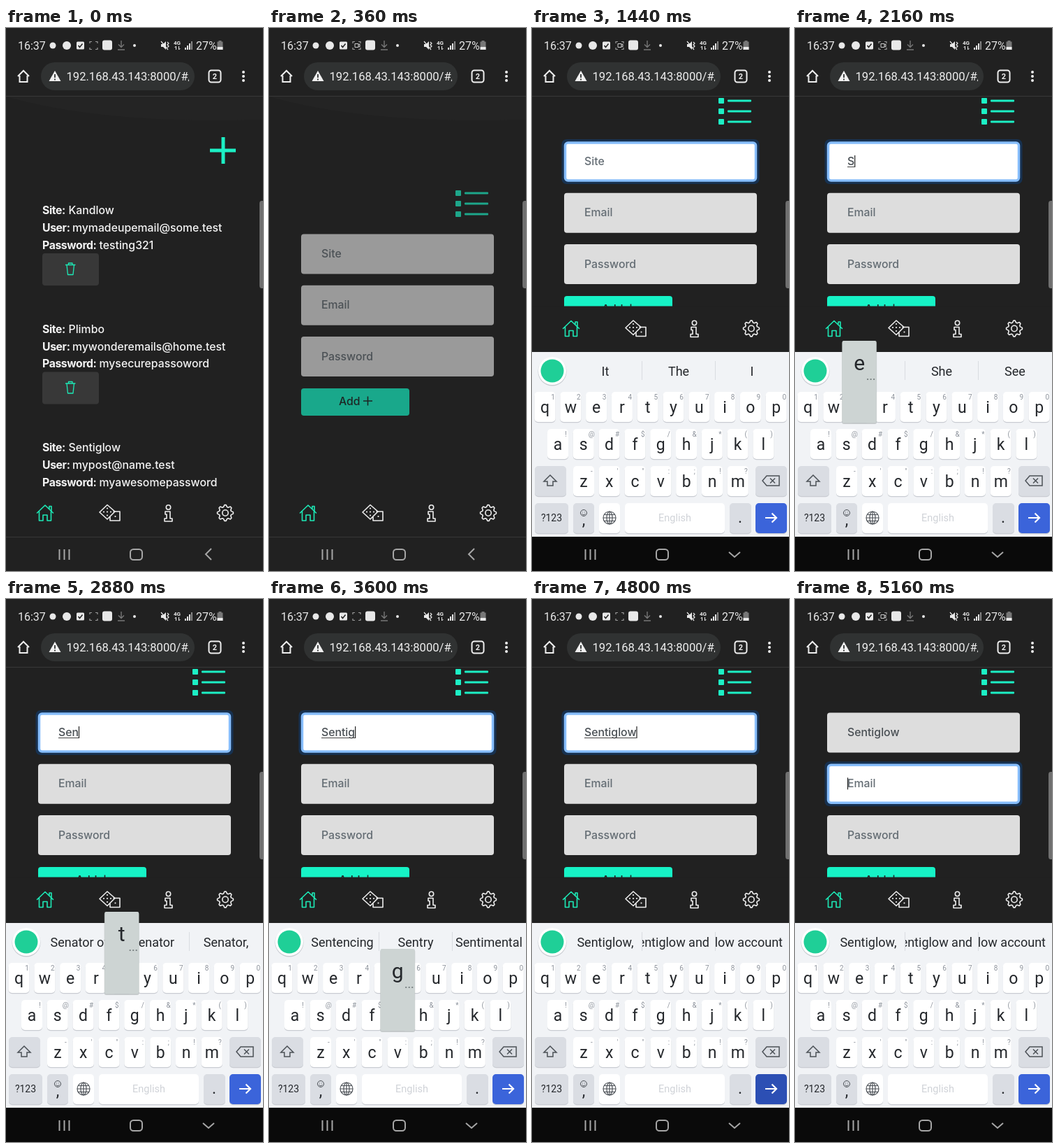
Write an HTML page that moves like this. It is 368x776 px and loops after 5280 ms.

```html
<!DOCTYPE html>
<html lang="en">
<head>
<meta charset="utf-8">
<title>Password list</title>
<style>
html, body { margin: 0; width: 100%; height: 100%; overflow: hidden; background: #212121; }
svg { display: block; width: 368px; height: 776px; }
text { font-family: Roboto, sans-serif; white-space: pre; }
.page text { font: 500 15.8px Inter, sans-serif; }
.list text { fill: #f4f4f4; }
.page .b { font-weight: 700; letter-spacing: -.4px; }
.line { fill: none; stroke: #eee; stroke-width: 1.6; stroke-linejoin: round; stroke-linecap: round; }
.mint { stroke: #1de9b6; }
.thin { stroke-width: 1.3; }
.dots { stroke-width: 2.2; }
.sys { fill: none; stroke: #a6a6a6; stroke-width: 2; }
.mid { text-anchor: middle; }
.hint { font-size: 10px; fill: #8d939c; text-anchor: middle; }
.key { font-size: 23px; fill: #24272b; text-anchor: middle; }
.sug { font-size: 18px; fill: #24272b; }
</style>
</head>
<body>
<svg viewBox="0 0 368 776">
  <defs>
    <clipPath id="view"><rect y="98" width="368" height="629"/></clipPath>
    <clipPath id="url"><rect x="80" y="50" width="182" height="38"/></clipPath>
    <clipPath id="cell0"><rect x="53" y="466" width="104" height="48"/></clipPath>
    <clipPath id="cell1"><rect x="158" y="466" width="104" height="48"/></clipPath>
    <clipPath id="cell2"><rect x="263" y="466" width="105" height="48"/></clipPath>
  </defs>
  <rect width="368" height="776" fill="#212121"/>

  <g clip-path="url(#view)" class="page">
    <path id="wave" d="M0 98Q140 138 368 131V98Z" fill="#242424"/>
    <g id="list" class="list">
      <path d="M292 175h37M311 156v38" stroke="#1cf0c5" stroke-width="5"/>
    </g>
    <g id="form">
      <g id="fields"></g>
      <rect x="46" y="515" width="155" height="39" rx="4" fill="#16f3c6"/>
      <text x="100" y="539" fill="#1c2b28">Add</text>
      <path d="M135 533h13M141.500 526.500v13" stroke="#1c2b28" stroke-width="1.600"/>
    </g>
    <g id="nav">
      <rect y="661" width="368" height="66" fill="#212121"/>
      <path class="line mint" d="M44.500 693L56 682L67.500 693M47.500 691V704H53V696H59V704H64.500V691M62 687V683.500H65V690"/>
      <g class="line">
        <path d="M145 681.500L156 691L145 702L134 692Z"/>
        <path d="M154 691H163V704H149V699"/>
        <path class="dots" d="M145 686.500h.01M140 691.500h.01M150 691.500h.01M145 696.500h.01M145 691.500h.01M156.500 698h.01"/>
        <circle cx="232.500" cy="685" r="3.200"/>
        <path d="M228 691H235V701H238V705H227V701H230V695H228Z"/>
        <path id="gear"/><circle cx="314" cy="693" r="4.200"/>
      </g>
    </g>
  </g>

  <!-- browser and status bars -->
  <path d="M0 97.500H368" stroke="#383838"/>
  <g fill="#e8e8e8">
    <text x="17" y="31" font-size="16">16:37</text>
    <circle cx="67" cy="25" r="4.500"/>
    <circle cx="87" cy="25" r="6"/>
    <rect x="101" y="19.500" width="11" height="11" rx="1.500"/>
    <path d="M103.500 25l2 2.500l4-5" fill="none" stroke="#212121" stroke-width="1.500"/>
    <path d="M120 22v-2.500h3M128 19.500h3V22M131 28v2.500h-3M123 30.500h-3V28" fill="none" stroke="#999" stroke-width="1.200"/>
    <path id="rec" d="M123 22.500h5v5h-5zM128 24l2-1v4l-2-1" fill="none" stroke="#ccc"/>
    <rect x="138" y="17.500" width="14" height="14" rx="3"/>
    <path d="M165 18v9M161 23.500l4 4l4-4M160 31h10" fill="none" stroke="#777" stroke-width="1.400"/>
    <circle cx="184" cy="25" r="2"/>
    <path d="M222 23h3l4-4v12l-4-4h-3z"/>
    <path d="M222 19l10 12M231 20l2 2l-2 2l2 2l-2 2" fill="none" stroke="#e8e8e8" stroke-width="1.200"/>
    <text x="240" y="24" font-size="8" font-weight="700">4G</text>
    <path d="M243.500 31v-5M241.500 28l2-2M247.500 26v5M249.500 29l-2 2" stroke="#e8e8e8" fill="none"/>
    <path d="M256 28h2v3h-2zM259 25h2v6h-2zM262 22h2v9h-2z"/>
    <path d="M265 19h2v12h-2z" fill="#888"/>
    <text x="272" y="31" font-size="16">27%</text>
    <path d="M304.500 18h4v1.500h2V31h-8V19.500h2z" fill="#777"/>
    <path d="M302.500 27h8v4h-8z"/>
  </g>
  <path d="M17 69L25 61L33 69M19.500 68V77H30.500V68" fill="none" stroke="#eee" stroke-width="2"/>
  <rect x="50" y="49" width="220" height="40" rx="20" fill="#303232"/>
  <path d="M70 61L78.500 76H61.500Z" fill="#f0f0f0"/>
  <path d="M70 66v5M70 72.500v2" stroke="#303232" stroke-width="1.800"/>
  <g clip-path="url(#url)"><text x="86.500" y="75" font-size="16.600" fill="#eee">192.168.43.143:8000/#/</text></g>
  <rect x="290.500" y="60.500" width="17" height="17" rx="3.500" fill="none" stroke="#eee" stroke-width="2"/>
  <text x="299" y="73" font-size="11" font-weight="700" fill="#eee" class="mid">2</text>
  <g fill="#eee"><circle cx="340" cy="63" r="2"/><circle cx="340" cy="69" r="2"/><circle cx="340" cy="75" r="2"/></g>

  <g id="board"></g>
  <g id="pop">
    <rect x="-25" y="1" width="50" height="118" rx="3" fill="#9ba3a3" opacity=".5"/>
    <rect x="-24.500" width="49" height="117" rx="2" fill="#cdd4d3"/>
    <text id="popKey" class="mid" y="42" font-size="30" fill="#24272b"></text>
    <path d="M11 55h2M15.500 55h2M20 55h2" stroke="#7d8586" stroke-width="2"/>
  </g>

  <rect id="bar" y="727" width="368" height="49"/>
  <path id="barLine" d="M0 727.500H368" stroke="#383838"/>
  <g class="sys">
    <path d="M76.500 745v15M83.500 745v15M90.500 745v15"/>
    <rect x="178" y="745" width="17" height="15" rx="4.500"/>
    <path id="back"/>
  </g>
  <path d="M368 247h-2q-3 0-3 4v117q0 4 3 4h2z" fill="#707070"/>
</svg>

<script>
const $ = id => document.getElementById(id);
const show = (id, on) => $(id).setAttribute('opacity', +on);
const move = (id, x, y) => $(id).setAttribute('transform', `translate(${x} ${y})`);
const rect = (x, y, w, h, fill, r = 4, more = '') =>
  `<rect x="${x}" y="${y}" width="${w}" height="${h}" rx="${r}" fill="${fill}" ${more}/>`;
const text = (x, y, s, attrs = '') => `<text x="${x}" y="${y}" ${attrs}>${s}</text>`;

// saved logins
const logins = [
  ['Kandlow', 'mymadeupemail@some.test', 'testing321'],
  ['Plimbo', 'mywonderemails@home.test', 'mysecurepassoword'],
  ['Sentiglow', 'mypost@name.test', 'myawesomepassword'],
];
$('list').innerHTML += logins.map(([site, user, pass], i) => `<g transform="translate(0 ${i * 169.5})">
  ${text(52, 266, 'Site:', 'class="b"')}${text(89.5, 266, site)}
  ${text(52, 291, 'User:', 'class="b"')}${text(95, 291, user)}
  ${text(52, 315.5, 'Password:', 'class="b"')}${text(133.5, 315.5, pass)}
  ${rect(52, 322, 81, 46, '#383838')}
  <path class="line mint thin" d="M85.500 338.500h13.500M89.500 338.500v-2.500h5.500v2.500M87 338.500l1.500 14h7.500l1.500-14"/></g>`).join('');

// form
const fieldY = i => 294.5 + i * 73.3;
$('form').insertAdjacentHTML('afterbegin', [236, 251, 266].map(y =>
  rect(267, y - 4, 8, 8, '#1cf0c5', 1) + rect(280, y - 1.5, 34, 3, '#1cf0c5', 1)).join(''));
$('fields').innerHTML = ['Site', 'Email', 'Password'].map((name, i) => {
  const y = fieldY(i);
  return `<g id="ring${i}">${rect(42.5, y - 3.5, 283, 64, '#123d70', 7, 'opacity=".6"')}</g>` +
    rect(46, y, 276, 57, '#ddd', 4, `id="box${i}"`) +
    text(75, y + 33.5, name, `id="val${i}" fill="#636c73"`);
}).join('') + '<path id="under" stroke="#444" /><path id="caret" stroke="#222" stroke-width="1.2"/>';

// gear outline
$('gear').setAttribute('d', 'M' + Array.from({ length: 32 }, (_, i) => {
  const a = (i - .5) * Math.PI / 16, r = i % 4 < 2 ? 11.5 : 8.8;
  return `${(314 + r * Math.cos(a)).toFixed(1)} ${(693 + r * Math.sin(a)).toFixed(1)}`;
}).join('L') + 'Z');

// keyboard
const rows = [
  ['qwertyuiop', '1234567890', 18.5, 520],
  ['asdfghjkl', '!@#$/&*()', 37, 573],
  ['zxcvbnm', '-\'":;!?', 74, 626],
];
const keyAt = {};
const cap = (x, y, w, fill = '#fff', id = '') =>
  rect(x, y + 1.2, w, 43, '#c9ccd2', 5) + rect(x, y, w, 43, fill, 5, id);
let keys = rect(0, 463, 368, 264, '#f1f3f6', 0) +
  '<path d="M157.500 476v27M262.500 476v27" stroke="#d9dce1"/>' +
  '<circle cx="29" cy="491" r="20.500" fill="#c9ccd2"/><circle cx="29" cy="490" r="20" fill="#fff"/>' +
  '<circle cx="29" cy="490" r="16.500" fill="#1fcf97"/>';
for (let i = 0; i < 3; i++) keys += `<g clip-path="url(#cell${i})"><text id="sug${i}" class="sug" y="497"></text></g>`;
for (const [chars, hints, x0, y] of rows) {
  [...chars].forEach((c, i) => {
    const x = x0 + i * 36.8;
    keyAt[c] = [x, y];
    keys += cap(x - 15, y, 30) + text(x, y + 30, c, 'class="key letter"') +
      text(x + 11.5, y + 11, hints[i], 'class="hint"');
  });
}
const grey = '#dadde3';
keys += cap(4, 626, 45, grey, 'id="shift"') + cap(320, 626, 45, grey) + cap(4, 679, 48, grey) +
  cap(59, 679, 30, grey) + cap(96, 679, 30) + cap(133, 679, 143) + cap(283, 679, 31, grey) +
  cap(320, 679, 45, '#3b64da', 'id="enter"') +
  text(28, 705, '?123', 'class="mid" font-size="14" fill="#24272b"') +
  text(74, 711, ',', 'class="key"') + text(298, 707, '.', 'class="key"') +
  text(204.5, 705, 'English', 'class="mid" font-size="14.5" fill="#d0d3d8"') +
  `<g fill="none" stroke="#4c5157" stroke-width="1.500">
    <path d="M26 639l-9 9h5v6h8v-6h5z"/>
    <path d="M336 640h18v14h-18l-6-7zM341 643.500l7 7M348 643.500l-7 7"/>
    <g stroke-width="1"><circle cx="74" cy="693" r="4.500"/><path d="M71.500 694.500q2.500 3 5 0M72.500 691.500v.8M75.500 691.500v.8"/></g>
    <g stroke-width="1.200"><circle cx="111" cy="700" r="9"/><ellipse cx="111" cy="700" rx="4" ry="9"/><path d="M102 700h18M103.500 695.500h15M103.500 704.500h15M111 691v18"/></g>
    <path d="M334 700h16M343.500 693.500l6.500 6.500l-6.500 6.500" stroke="#fff" stroke-width="2.200"/></g>`;
$('board').innerHTML = keys;
const letters = [...document.querySelectorAll('.letter')].map(el => [el, el.textContent]);

// timelines: [start in ms, value]
const name = 'Sentiglow';
const typed = [[0, 0], [1920, 1], [2280, 2], [2760, 3], [3000, 4], [3480, 5], [3600, 6], [3960, 7], [4080, 8], [4440, 9]];
const popups = [[0, ''], [1800, 's'], [1920, ''], [2040, 'e'], [2280, ''], [2640, 'n'], [2760, ''], [2880, 't'], [3000, ''],
  [3240, 'i'], [3480, ''], [3600, 'g'], [3720, ''], [3840, 'l'], [3960, 'o'], [4080, ''], [4320, 'w'], [4440, '']];
const words = [[0, 'It|The|I'], [1920, 'So|She|See'], [2280, 'Set|See|Send'], [2760, 'Senator of|Senator|Senator,'],
  [3000, 'Sent to|Sent|Sent,'], [3480, 'Sentencing|Sentry|Sentimental'],
  [3960, `${name} are|${name}|${name},`], [4440, `${name},|${name} and|${name} account`]];
const listFade = [[0, 1], [120, .65], [240, .2], [360, 0]];
const formFade = [[0, 0], [240, .2], [360, .65], [480, 1]];
const drop = [[0, 265], [1080, 190], [1200, 60], [1320, 0]];
const holds = [[480, 840], [1440, 1680], [2280, 2640], [3240, 3480], [4080, 4320], [4440, 4800]];
const at = (track, t) => track.findLast(([start]) => start <= t)[1];

function suggest(t) {
  at(words, t).split('|').forEach((word, i) => {
    const el = $('sug' + i), left = 53 + i * 105, tail = t >= 4440 && i;
    el.textContent = word;
    const wide = el.getComputedTextLength() > 102;
    el.setAttribute('text-anchor', wide ? (tail ? 'end' : 'start') : 'middle');
    el.setAttribute('x', left + (wide ? (tail ? 96 : 2) : 52));
  });
}

function fields(t) {
  const focus = t < 840 ? -1 : t < 4920 ? 0 : 1;
  const value = name.slice(0, at(typed, t));
  const site = $('val0');
  site.textContent = value || 'Site';
  site.setAttribute('fill', value ? '#484e53' : '#636c73');
  for (let i = 0; i < 3; i++) {
    const on = i === focus, box = $('box' + i), inset = on ? 1.5 : 0;
    show('ring' + i, on);
    box.setAttribute('fill', on ? '#fff' : '#ddd');
    box.setAttribute('stroke', on ? '#86bdfb' : 'none');
    box.setAttribute('stroke-width', 3.5);
    box.setAttribute('x', 46 + inset);
    box.setAttribute('y', fieldY(i) + inset);
    box.setAttribute('width', 276 - 2 * inset);
    box.setAttribute('height', 57 - 2 * inset);
  }
  const end = 75 + (value && focus === 0 ? site.getComputedTextLength() : 0);
  const y = fieldY(Math.max(focus, 0)) + 19.5;
  $('under').setAttribute('d', value && focus === 0 ? `M75 330.500H${end}` : '');
  $('caret').setAttribute('d', `M${end + .5} ${y}v17`);
  show('caret', focus >= 0 && !(t >= 1320 && t < 1680));
}

function draw(ms) {
  let t = Math.floor(ms / 120) * 120;
  for (const [from, to] of holds) if (t > from && t < to) t = from;
  const raised = t >= 1200;

  show('list', at(listFade, t));
  show('form', at(formFade, t));
  show('wave', t < 960);
  show('rec', (t + 840) % 960 < 480);
  move('form', 0, raised ? -132 : 0);
  move('nav', 0, raised ? -263.5 : 0);
  fields(t);

  move('board', 0, at(drop, t));
  show('board', t >= 1080);
  suggest(t);
  const upper = t >= 1680 && t < 1920;
  for (const [el, c] of letters) el.textContent = upper ? c.toUpperCase() : c;
  $('shift').setAttribute('fill', upper ? '#c3c8d0' : grey);
  $('enter').setAttribute('fill', t === 4800 ? '#2c4fb4' : '#3b64da');

  const key = at(popups, t);
  show('pop', !!key);
  if (key) {
    move('pop', keyAt[key][0], keyAt[key][1] - 73);
    $('popKey').textContent = upper ? key.toUpperCase() : key;
  }

  $('bar').setAttribute('fill', t >= 1080 ? '#0a0a0a' : '#212121');
  show('barLine', t < 1080);
  $('back').setAttribute('d', t < 960 ? 'M294 744l-8 8l8 8' : 'M282 749l8 7l8-7');
}

let last = -1;
function tick() {
  const step = Math.floor(performance.now() % 5280 / 120);
  if (step !== last) draw((last = step) * 120);
  requestAnimationFrame(tick);
}
tick();
</script>
</body>
</html>
```
